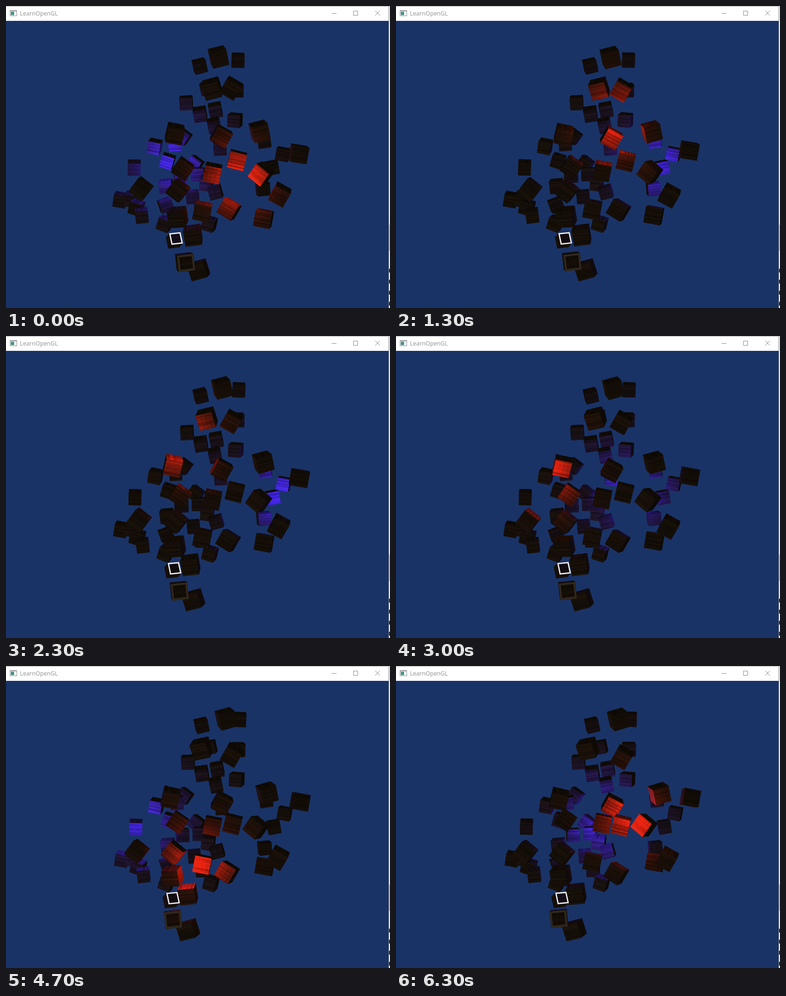
Animation, 803 px wide and 630 px high, one loop 6400 ms. Source, as an HTML page with a canvas:

```html
<!DOCTYPE html>
<html lang="en">
<head>
<meta charset="utf-8">
<title>LearnOpenGL</title>
<style>
  html, body { margin: 0; width: 100%; height: 100%; overflow: hidden; background: #fff; }
  canvas { display: block; }
</style>
</head>
<body>
<canvas id="stage" width="803" height="630"></canvas>
<script>
const ctx = document.getElementById('stage').getContext('2d');
const LOOP = 6400, STEP = 100, TRAVEL = 6.3;
const FOCAL = 724, CX = 400, CY = 331, RAD = Math.PI / 180;

const clamp = (v, lo, hi) => Math.max(lo, Math.min(hi, v));
const hash = n => { const s = Math.sin(n * 127.1) * 43758.5; return s - Math.floor(s); };
const spread = (n, mid, range) => mid + range * (2 * hash(n) - 1);

const boxes = [];

// Evenly spaced boxes from one point to another, sharing size and drift
function row([x0, y0], [x1, y1], count, { edge, drift, roll }) {
  for (let i = 0; i < count; i++) {
    const k = i / (count - 1), seed = boxes.length + 1;
    boxes.push({
      x: x0 + (x1 - x0) * k, y: y0 + (y1 - y0) * k, edge, drift,
      roll: roll ?? spread(seed, 0, 20),
      pitch: spread(seed + 0.3, 14, 8),
      yaw: spread(seed + 0.6, 3, 14)
    });
  }
}

const far = { edge: 26, drift: [5, -2] };
row([405, 125], [438, 217], 3, { ...far, roll: -12 });
row([485, 113], [479, 238], 3, { ...far, roll: 2 });
row([377, 202], [435, 249], 3, far);
row([370, 272], [395, 329], 2, { ...far, roll: 35 });
row([353, 287], [447, 296], 2, far);
row([311, 293], [365, 354], 3, far);
row([268, 337], [239, 404], 2, far);
row([262, 403], [284, 437], 3, far);
row([335, 376], [332, 454], 3, far);
row([401, 351], [438, 388], 3, far);
row([390, 398], [425, 454], 3, far);
row([540, 282], [556, 337], 2, far);
row([579, 309], [537, 381], 2, far);

const near = (from, to, drift, roll) => row(from, to, 2, { edge: 34, drift, roll });
near([444, 106], [530, 261], [21, 5], -12);
near([431, 172], [403, 550], [-30, 0], -18);
near([471, 171], [450, 271], [2, 19], 30);
near([353, 266], [483, 321], [-12, 11], 14);
near([612, 308], [539, 443], [3, -33], 10);
near([432, 348], [411, 428], [0, -20], 11);
near([370, 339], [534, 350], [-15, -18], 35);
near([360, 384], [283, 381], [-12, 7], 37);
near([467, 423], [573, 393], [-6, 9], 30);
near([391, 478], [359, 440], [-14, -3], -10);

boxes.push(
  { x: 352, y: 489, edge: 25, drift: [-9, -1], roll: -12, pitch: -16, yaw: -20, frame: '#f4f2f4', band: 2.6 },
  { x: 374, y: 534, edge: 34, drift: [-33, -8], roll: -6, pitch: 8, yaw: -8, frame: '#30281d', band: 4 }
);

// x right, y down, z towards the viewer
function rotator(roll, pitch, yaw) {
  const [cr, sr, cp, sp, cy, sy] = [roll, pitch, yaw].flatMap(a => [Math.cos(a * RAD), Math.sin(a * RAD)]);
  return ([x, y, z]) => {
    const x1 = x * cy - z * sy, z1 = x * sy + z * cy;
    const y2 = y * cp + z1 * sp, z2 = z1 * cp - y * sp;
    return [x1 * cr - y2 * sr, x1 * sr + y2 * cr, z2];
  };
}

// Red circles in front of the boxes, blue swings sideways among the far ones
function lightsAt(t) {
  const a = (62.4 * t - 30) * RAD;
  return [
    { pos: [2.7 * Math.cos(a), -2.7 * Math.sin(a) - 0.2, -19.8], rgb: [240, 22, 10], reach: 2.5, power: 5 },
    { pos: [1 + 6 * Math.sin(1.1 * (t - 0.55)), 0.2, -25.3], rgb: [60, 32, 290], reach: 3.5, power: 3 }
  ];
}

function shade(p, n, lights, grain) {
  const glow = Math.max(0, -0.5 * n[0] + 0.6 * n[1] + 0.2 * n[2]);
  const c = [17 + 14 * glow, 12 + 10 * glow, 6 + 8 * glow];
  for (const { pos, rgb, reach, power } of lights) {
    const l = pos.map((v, i) => v - p[i]), d = Math.hypot(...l);
    const facing = Math.max(0, l[0] * n[0] + l[1] * n[1] + l[2] * n[2]) / d;
    const k = facing / (1 + (d / reach) ** power);
    rgb.forEach((v, i) => c[i] += v * k);
  }
  return `rgb(${c.map(v => clamp(v * grain, 0, 235) | 0)})`;
}

function drawBox({ x: x0, y: y0, edge, drift: [dx, dy], roll, pitch, yaw, frame, band }, id, f, lights) {
  const x = x0 + dx * f, y = y0 + dy * f;
  const turn = 0.35 * clamp((edge - 29) / 4, -1, 1) * f;
  const rot = rotator(roll, pitch + dy * turn, yaw - dx * turn);
  const depth = FOCAL / edge, origin = [(x - CX) / edge, (y - CY) / edge, -depth];
  const project = v => {
    const k = FOCAL / (depth - v[2]);
    return [x + v[0] * k, y + v[1] * k];
  };
  for (let axis = 0; axis < 3; axis++) for (const side of [-1, 1]) {
    const onFace = (u, v, w = side / 2) => {
      const p = [];
      p[axis] = w; p[(axis + 1) % 3] = u; p[(axis + 2) % 3] = v;
      return rot(p);
    };
    const n = onFace(0, 0, side);
    if (n[2] < 0.02) continue;
    const quad = (u0, v0, u1, v1) => {
      ctx.beginPath();
      for (const [u, v] of [[u0, v0], [u1, v0], [u1, v1], [u0, v1]]) ctx.lineTo(...project(onFace(u, v)));
      ctx.closePath();
    };
    const colour = (u, v, grain) => shade(onFace(u, v).map((c, i) => c + origin[i]), n, lights, grain);

    ctx.fillStyle = colour(0, 0, 0.85);
    quad(-0.5, -0.5, 0.5, 0.5);
    ctx.fill();
    const planks = 10, parts = 4;
    for (let i = 0; i < planks; i++) for (let j = 0; j < parts; j++) {
      const u = j / parts - 0.5, v = i / planks - 0.5;
      const grain = 0.7 + 0.45 * hash(id * 31 + axis * 11 + i) + 0.08 * hash(i * 7 + j);
      ctx.fillStyle = colour(u + 0.5 / parts, v + 0.5 / planks, grain);
      quad(u, v, u + 1 / parts, v + 1 / planks);
      ctx.fill();
    }
    if (frame && axis === 2) {
      const r = 0.5 - band / 2 / edge;
      ctx.strokeStyle = frame;
      ctx.lineWidth = band;
      quad(-r, -r, r, r);
      ctx.stroke();
    }
  }
}

function rect(colour, x, y, w, h) {
  ctx.fillStyle = colour;
  ctx.fillRect(x, y, w, h);
}

function drawWindow() {
  rect('#fff', 0, 0, 803, 630);
  rect('#1a3366', 0, 31, 800, 599);
  rect('#a5a5a5', 0, 0, 801, 1);
  rect('#8e9299', 800, 0, 1, 630);
  rect('#e6e6e6', 801, 0, 2, 630);
  rect('#b4b4b4', 801, 456, 2, 55);
  for (let y = 548; y < 630; y += 23) rect('#222', 801, y, 2, 8);

  rect('#8a8f94', 8, 9, 15, 12);
  rect('#fff', 9, 11, 13, 9);
  rect('#4a8f86', 10, 12, 7, 7);
  ctx.fillStyle = '#999';
  ctx.font = '12.2px "Noto Sans", sans-serif';
  ctx.fillText('LearnOpenGL', 29, 20);

  ctx.strokeStyle = '#8c8c8c';
  ctx.lineWidth = 1;
  ctx.beginPath();
  ctx.moveTo(681, 15.5); ctx.lineTo(691, 15.5);
  ctx.rect(726.5, 10.5, 9, 9);
  ctx.moveTo(772, 10); ctx.lineTo(782, 20);
  ctx.moveTo(782, 10); ctx.lineTo(772, 20);
  ctx.stroke();
}

function render(now) {
  const t = Math.floor(now % LOOP / STEP) * STEP / 1000;
  const lights = lightsAt(t);
  drawWindow();
  boxes.forEach((box, id) => drawBox(box, id, t / TRAVEL, lights));
  requestAnimationFrame(render);
}
requestAnimationFrame(render);
</script>
</body>
</html>
```
